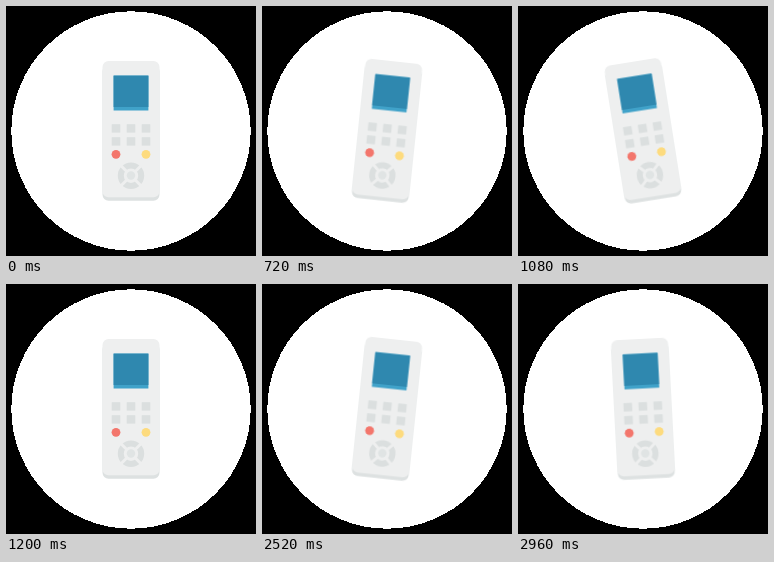
These frames come from a looping animation (250x250 px, 3 s). An HTML page:

```html
<!DOCTYPE html>
<html lang="en">
<head>
<meta charset="utf-8">
<title>Shaking remote</title>
<style>
  html, body { margin: 0; width: 100%; height: 100%; overflow: hidden; background: #000; }
  svg { display: block; width: 100%; height: 100%; }

  /* Two shakes of 15 degrees each way, at 25 steps a second */
  .remote {
    transform-origin: 125px 125px;
    animation: shake 3s linear infinite;
  }
  @keyframes shake {
    0%        { transform: rotate(0deg); }
    13.33333% { transform: rotate(0deg);   animation-timing-function: steps(5); }
    20%       { transform: rotate(15deg);  animation-timing-function: steps(10); }
    33.33333% { transform: rotate(-15deg); animation-timing-function: steps(5); }
    40%       { transform: rotate(0deg); }
    73.33333% { transform: rotate(0deg);   animation-timing-function: steps(5); }
    80%       { transform: rotate(15deg);  animation-timing-function: steps(10); }
    93.33333% { transform: rotate(-15deg); animation-timing-function: steps(5); }
    100%      { transform: rotate(0deg); }
  }
</style>
</head>
<body>
<svg viewBox="0 0 250 250">
  <defs>
    <rect id="key" width="8.6" height="8.4"/>
    <g id="row">
      <use href="#key" x="105.7"/>
      <use href="#key" x="120.7"/>
      <use href="#key" x="135.7"/>
    </g>
  </defs>
  <circle cx="125" cy="125" r="119.7" fill="#fff" shape-rendering="crispEdges"/>
  <g class="remote">
    <rect x="96.5" y="59" width="57" height="135.8" rx="6" fill="#dde1e1"/>
    <rect x="96.5" y="55" width="57" height="136.3" rx="6" fill="#eeefef"/>
    <rect x="107.6" y="69.6" width="34.8" height="34.9" fill="#40a2c9"/>
    <rect x="107.6" y="69.6" width="34.8" height="31.4" fill="#2f88af"/>
    <g fill="#dbdfdf">
      <use href="#row" y="118.2"/>
      <use href="#row" y="131.2"/>
    </g>
    <circle cx="110" cy="148.3" r="4.4" fill="#f3766c"/>
    <circle cx="140" cy="148.3" r="4.4" fill="#fddb7e"/>
    <circle cx="125" cy="169.7" r="10.2" fill="none" stroke="#dbdfdf" stroke-width="6"/>
    <path d="M115 159.7l6 6M129 173.7l6 6M135 159.7l-6 6M121 173.7l-6 6" stroke="#eeefef" stroke-width="3"/>
    <circle cx="125" cy="169.5" r="4.2" fill="#e0e4e4"/>
  </g>
</svg>
</body>
</html>
```
